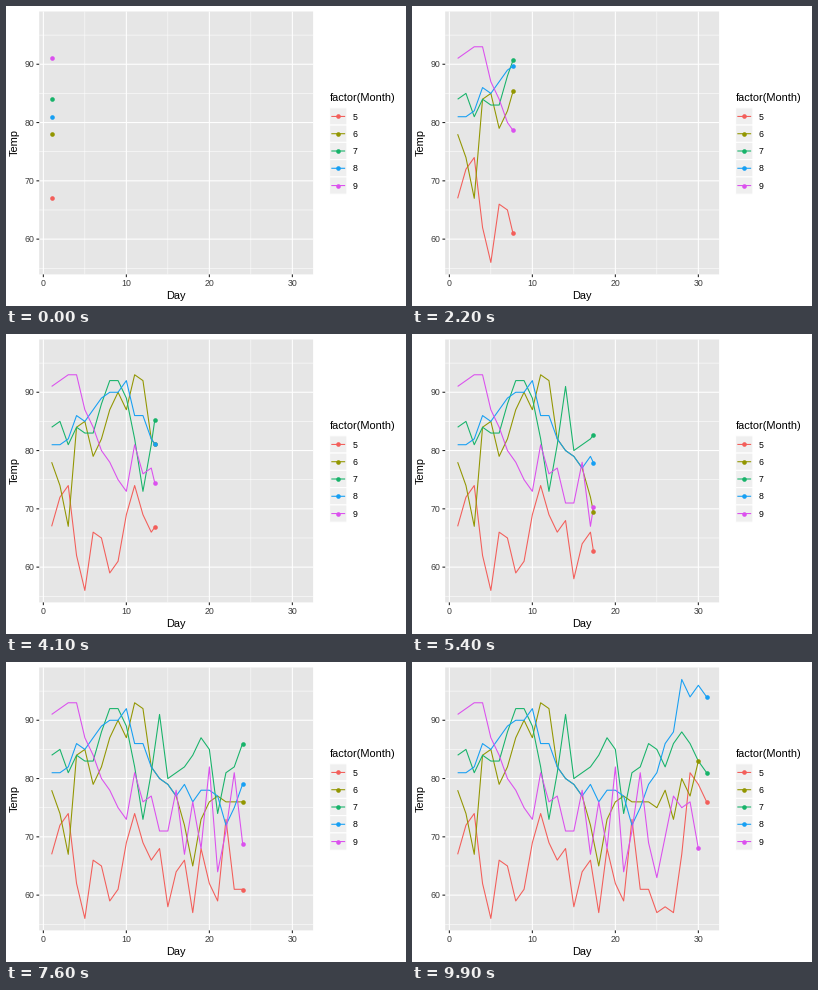
Recreate the animation shown at these times as a matplotlib script. Size 400 by 300 pixels, loop 10000 ms.

```python
import matplotlib.pyplot as plt
import numpy as np
from matplotlib.animation import FuncAnimation
from matplotlib.patches import Rectangle

plt.rcParams["font.family"] = "Liberation Sans"
plt.rcParams["path.snap"] = False

W, H, DPI = 400, 300, 100
FRAMES, INTERVAL = 100, 100
PT = 72 / DPI  # points per pixel

# Panel edges in pixels and the data range they span
LEFT, RIGHT, TOP, BOTTOM = 33.2, 307.1, 5.5, 268.4
X_MIN, X_MAX, Y_MIN, Y_MAX = -0.5, 32.5, 53.95, 99.05
LINE, DOT = 1.07, 4.6

# Daily temperatures by month
may = [67, 72, 74, 62, 56, 66, 65, 59, 61, 69, 74, 69, 66, 68, 58, 64,
       66, 57, 68, 62, 59, 73, 61, 61, 57, 58, 57, 67, 81, 79, 76]
june = [78, 74, 67, 84, 85, 79, 82, 87, 90, 87, 93, 92, 82, 80, 79, 77,
        72, 65, 73, 76, 77, 76, 76, 76, 75, 78, 73, 80, 77, 83]
july = [84, 85, 81, 84, 83, 83, 88, 92, 92, 89, 82, 73, 81, 91, 80, 81,
        82, 84, 87, 85, 74, 81, 82, 86, 85, 82, 86, 88, 86, 83, 81]
august = [81, 81, 82, 86, 85, 87, 89, 90, 90, 92, 86, 86, 82, 80, 79, 77,
          79, 76, 78, 78, 77, 72, 75, 79, 81, 86, 88, 97, 94, 96, 94]
september = [91, 92, 93, 93, 87, 84, 80, 78, 75, 73, 81, 76, 77, 71, 71, 78,
             67, 76, 68, 82, 64, 71, 81, 69, 63, 70, 77, 75, 76, 68]

months = [may, june, july, august, september]
colors = ["#f35e5a", "#929600", "#17b36a", "#169ff3", "#db50ee"]


def px(day):
    return LEFT + (np.asarray(day) - X_MIN) / (X_MAX - X_MIN) * (RIGHT - LEFT)


def py(temp):
    return BOTTOM - (np.asarray(temp) - Y_MIN) / (Y_MAX - Y_MIN) * (BOTTOM - TOP)


fig = plt.figure(figsize=(W / DPI, H / DPI), dpi=DPI, facecolor="white")
ax = fig.add_axes([0, 0, 1, 1])
ax.set_xlim(0, W)
ax.set_ylim(H, 0)
ax.axis("off")


def stroke(x, y, color, width=LINE, z=2):
    return ax.plot(x, y, color=color, lw=width * PT, zorder=z,
                   solid_capstyle="butt", solid_joinstyle="round")[0]


def dot(x, y, color):
    return ax.plot(x, y, "o", color=color, ms=DOT * PT, mew=0, zorder=5)[0]


def label(x, y, text, size, color="black", **kw):
    ax.text(x, y, text, fontsize=size * PT, color=color,
            **{"va": "baseline", **kw})


def box(x, y, w, h, fill, edge="none"):
    ax.add_patch(Rectangle((x, y), w, h, facecolor=fill, edgecolor=edge,
                           lw=LINE * PT, zorder=1))


def draw_panel():
    box(LEFT, TOP, RIGHT - LEFT, BOTTOM - TOP, "#e6e6e6")
    for day in range(0, 31, 5):
        x, major = px(day), day % 10 == 0
        stroke([x, x], [TOP, BOTTOM], "white", LINE if major else LINE / 2)
        if major:
            stroke([x, x], [BOTTOM, BOTTOM + 2.75], "#222222")
            label(x, 279.7, str(day), 8.8, "#3c3c3c", ha="center")
    for temp in range(55, 100, 5):
        y, major = py(temp), temp % 10 == 0
        stroke([LEFT, RIGHT], [y, y], "white", LINE if major else LINE / 2)
        if major:
            stroke([LEFT - 2.75, LEFT], [y, y], "#222222")
            label(LEFT - 4.95, y + 3.15, str(temp), 8.8, "#3c3c3c", ha="right")
    label((LEFT + RIGHT) / 2, 292.6, "Day", 11, ha="center")
    label(13.4, (TOP + BOTTOM) / 2, "Temp", 11, rotation=90,
          ha="right", va="center")


def draw_legend():
    x, y, key = 323.6, 101.8, 17.28
    label(x, 94.8, "factor(Month)", 11)
    for i, color in enumerate(colors):
        mid = y + key * (i + 0.5)
        box(x, y + key * i, key, key, "#efefef", "white")
        stroke([x + 0.1 * key, x + 0.9 * key], [mid, mid], color)
        dot([x + key / 2], [mid], color)
        label(x + key + 5.5, mid + 3.15, str(i + 5), 8.8)


draw_panel()
draw_legend()
paths = [stroke([], [], c, z=4) for c in colors]
heads = [dot([], [], c) for c in colors]


def update(frame):
    now = 1 + 30 * frame / (FRAMES - 1)
    for temps, path, head in zip(months, paths, heads):
        t = min(now, len(temps))
        days = np.arange(1, len(temps) + 1)
        shown = np.append(days[days < t], t)
        x, y = px(shown), py(np.interp(shown, days, temps))
        path.set_data(x, y)
        head.set_data(x[-1:], y[-1:])
    return paths + heads


anim = FuncAnimation(fig, update, frames=FRAMES, interval=INTERVAL,
                     repeat=True, repeat_delay=0, blit=False)
plt.show()
```
